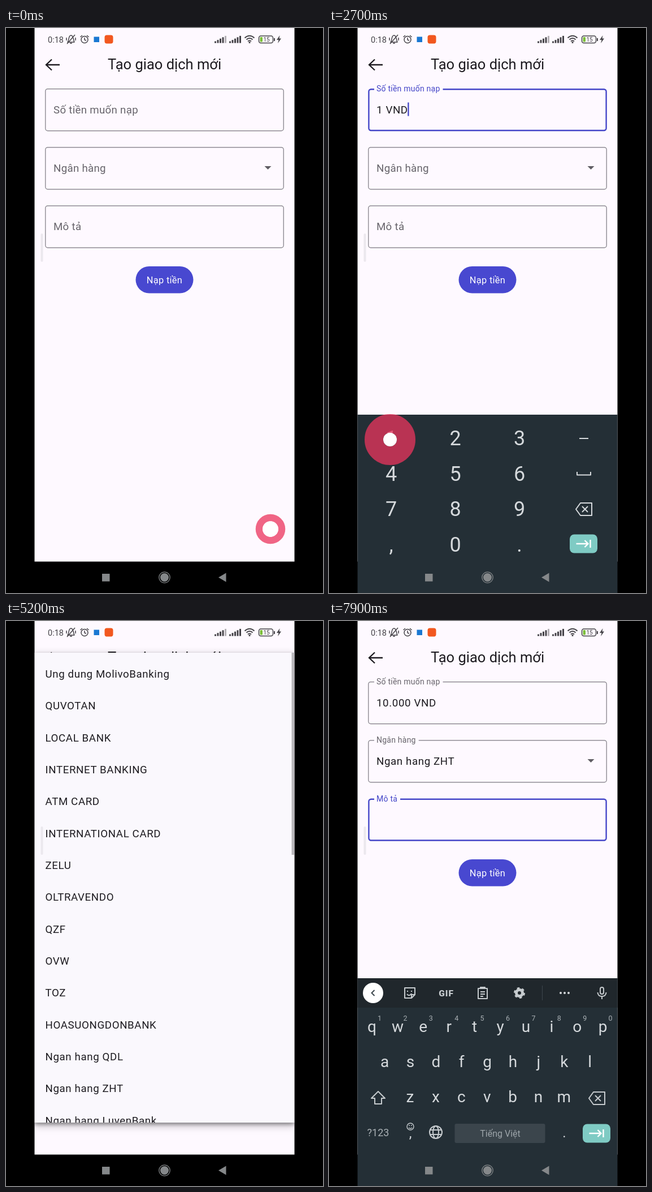
These frames come from a looping animation (561x998 px, 8000 ms). An HTML page:

```html
<!DOCTYPE html>
<html lang="vi">
<head>
<meta charset="utf-8">
<title>Tạo giao dịch mới</title>
<style>
  html, body { margin: 0; width: 100%; height: 100%; overflow: hidden; background: #000; }
  svg { display: block; }
  text { font-family: Roboto, "Open Sans", sans-serif; white-space: pre; }
  .body { font-size: 18.7px; letter-spacing: .62px; fill: #1d1b20; }
  .label { font-size: 18.7px; letter-spacing: .3px; }
  .line { fill: none; stroke: currentColor; stroke-width: 2; stroke-linejoin: round; }
  .mid { text-anchor: middle; }
  #sheet { filter: drop-shadow(0 3px 3px #0005) drop-shadow(0 4px 7px #0004); }
</style>
</head>
<body>
<svg width="561" height="998" viewBox="0 0 561 998">
  <defs>
    <clipPath id="phone"><rect x="50.500" y="0" width="460" height="998"/></clipPath>
    <clipPath id="window"><rect id="hole" x="50.500" width="460"/></clipPath>
    <g id="erase" class="line">
      <path d="M-14 0L-6-11H14V11H-6ZM-3-5L7 5M7-5L-3 5"/>
    </g>
    <g id="next">
      <rect x="-24.5" y="-16.5" width="49" height="33" rx="8" fill="#7fcbc4"/>
      <path d="M-13 0H8M2-6L8 0L2 6M12-7V7" fill="none" stroke="#fff" stroke-width="2.4"/>
    </g>
  </defs>
  <rect width="561" height="998"/>
  <g clip-path="url(#phone)">
    <rect x="50" width="461" height="942.5" fill="#fef9ff"/>

    <path d="M95 65H71M81 55.500L71 65L81 74.500" fill="none" stroke="#1d1b20" stroke-width="2.3"/>
    <text class="mid" x="280.500" y="73" font-size="25.5" fill="#1d1b20">Tạo giao dịch mới</text>
    <g id="form"></g>
    <path d="M457.500 244H469.500L463.500 250Z" fill="#605d64"/>
    <rect x="229.500" y="421" width="102" height="47.500" rx="23.750" fill="#4848d0"/>
    <text class="mid" x="280.500" y="451" font-size="16.4" letter-spacing=".3" fill="#fff">Nạp tiền</text>
    <rect id="caret" width="2.3" height="24" fill="#4446c8"/>

    <g id="menu">
      <rect id="sheet" x="50.500" width="460" fill="#faf8fd"/>
      <g clip-path="url(#window)">
        <g id="rows"></g>
        <rect id="thumb" x="505.500" width="5" height="357" fill="#b9b7bb"/>
      </g>
    </g>

    <g id="status" fill="#454348" color="#454348">
      <text x="74" y="25.500" font-size="14.5">0:18</text>
      <g class="line" style="stroke-width:1.5">
        <path d="M109 25C112 22 110 13 115 13S119 22 121 25ZM113 27H117M108 28L122 12M107 17V22M123 17V22"/>
        <circle cx="139" cy="20.500" r="6"/>
        <path d="M139 17V21L142 22M131.500 16L135 13M143 13L146.500 16"/>
        <path d="M422.500 17.500Q431 10 439.500 17.500M425.500 20.500Q431 15.500 436.500 20.500M428 23.500Q431 21 434 23.500" style="stroke-width:2"/>
        <rect x="447.500" y="14" width="25" height="12.500" rx="3.500"/>
      </g>
      <circle cx="431" cy="25.500" r="1.6"/>
      <rect x="155.500" y="15.500" width="9.500" height="9.500" fill="#1a78d2"/>
      <rect x="174.500" y="12.500" width="15" height="15" rx="4" fill="#f2581f"/>
      <rect x="449.500" y="16" width="4.500" height="8.500" rx="1" fill="#7cbf3a"/>
      <text class="mid" x="461" y="24" font-size="10">15</text>
      <path d="M474 18h2v5h-2ZM484.500 13L479 21H482.500L481 27L487 18.500H483.500Z"/>
    </g>
    <rect x="61.500" y="363" width="4" height="50" rx="2" fill="#e9e6eb" opacity=".85"/>

    <g id="digits" fill="#d5d9dc" color="#d5d9dc">
      <rect x="50" y="683" width="461" height="320" fill="#242f36"/>
      <rect id="pressed" width="114" height="63" fill="#3c464c"/>
    </g>
    <g id="letters" fill="#d5d9dc" color="#c6cbce">
      <rect x="50" y="631" width="461" height="370" fill="#242f36"/>
      <rect x="50" y="631" width="461" height="52" fill="#20272c"/>
      <circle cx="78" cy="657" r="18" fill="#fff"/>
      <path d="M80.500 652L75.500 657L80.500 662" fill="none" stroke="#3c464c" stroke-width="2"/>
      <g class="line">
        <path d="M134 648H152V660L146 666H134ZM152 660H146V666M138 659Q142 664 146 658M139 653V655M146 653V655"/>
        <path d="M264 649H280V667H264ZM268 649V647H276V649M268 655H276M268 659H276M268 663H273"/>
        <circle cx="337" cy="657" r="5.500" style="stroke-width:5"/>
        <circle cx="337" cy="657" r="8.500" style="stroke-width:3" stroke-dasharray="4.450"/>
        <rect x="480" y="647" width="6" height="12" rx="3"/>
        <path d="M475.500 656Q476 663 483 663T490.500 656M483 663V668"/>
        <path d="M87 831L99 843H93V853H81V843H75Z"/>
        <circle cx="144" cy="893" r="6" style="stroke-width:1.4"/>
        <path d="M141 895Q144 898 147 895M142 890V892M146 890V892" style="stroke-width:1.4"/>
        <circle cx="189" cy="903" r="11"/>
        <ellipse cx="189" cy="903" rx="5" ry="11"/>
        <path d="M179 899H199M179 907H199"/>
      </g>
      <path d="M377.500 644V670" stroke="#3c464c"/>
      <circle cx="410" cy="657" r="2"/><circle cx="417" cy="657" r="2"/><circle cx="424" cy="657" r="2"/>
      <rect x="222.500" y="888" width="160" height="34" rx="3" fill="#3b454c"/>
      <use href="#erase" x="474" y="843"/>
      <use href="#next" x="473.500" y="905"/>
    </g>
    <g fill="#85888a">
      <rect x="170" y="964" width="13.500" height="13.500"/>
      <circle cx="280.500" cy="970.500" r="7.500"/>
      <circle cx="280.500" cy="970.500" r="9.700" fill="none" stroke="#85888a" stroke-width="1.3"/>
      <path d="M376 970.500L389.500 962.500V978.500Z"/>
    </g>
  </g>
  <g id="touches"></g>
</svg>
<script>
const $ = id => document.getElementById(id);
const clamp = v => Math.min(1, Math.max(0, v));
const lerp = (a, b, p) => a + (b - a) * p;
const ease = (t, start, length) => {
  const p = clamp((t - start) / length);
  return p * p * (3 - 2 * p);
};

function add(parent, tag, attrs, text = '') {
  const el = document.createElementNS('http://www.w3.org/2000/svg', tag);
  set(el, attrs);
  el.textContent = text;
  return parent.appendChild(el);
}
function set(el, attrs) {
  for (const name in attrs) el.setAttribute(name, attrs[name]);
}
const key = (board, x, y, size, text, more) =>
  add(board, 'text', { class: 'mid', x, y, 'font-size': size, ...more }, text);

// Signal bars
for (const x of [369, 395])
  for (let i = 0; i < 5; i++) {
    const h = 3 + i * 2.4;
    add($('status'), 'rect', { x: x + i * 4.5, y: 26.5 - h, width: 3, height: h, opacity: x < 380 && i == 4 ? .4 : 1 });
  }

// Number pad
['123', '456', '789', ',0.'].forEach((row, r) =>
  [...row].forEach((c, i) => key($('digits'), 110 + i * 113.5, 737 + r * 62.6, 36, c)));
add($('digits'), 'path', { class: 'line', d: 'M443 725H459M439 784V789.500H463V784' });
add($('digits'), 'use', { href: '#erase', x: 451, y: 850 });
add($('digits'), 'use', { href: '#next', x: 450.5, y: 911 });

// Letter keyboard
[['qwertyuiop', 76, 726], ['asdfghjkl', 98.5, 788], ['zxcvbnm', 143.5, 850]].forEach(([row, x, y], r) =>
  [...row].forEach((c, i) => {
    key($('letters'), x + i * 45.4, y, 28, c);
    if (!r) key($('letters'), x + 13.5 + i * 45.4, 705.5, 12.5, (i + 1) % 10, { fill: '#a9b0b4' });
  }));
key($('letters'), 87, 909.5, 18, '?123', { fill: '#a9b0b4' });
key($('letters'), 144, 913, 24, ',');
key($('letters'), 416.5, 912, 24, '.');
key($('letters'), 303, 911, 16, 'Tiếng Việt', { fill: '#9ea6ab' });
key($('letters'), 207.5, 662.5, 15.5, 'GIF', { 'font-weight': 900, fill: '#c6cbce', 'letter-spacing': 1 });

// Bank list
const bank = 'Ngan hang ZHT';
const rows = ['Ung dung MolivoBanking', 'QUVOTAN', 'LOCAL BANK', 'INTERNET BANKING', 'ATM CARD',
  'INTERNATIONAL CARD', 'ZELU', 'OLTRAVENDO', 'QZF', 'OVW', 'TOZ', 'HOASUONGDONBANK', 'Ngan hang QDL',
  bank, 'Ngan hang LuvenBank', 'Ngan hang OdaxBank', 'Ngan hang ZFBANK', 'Ngan hang TuvoBank', 'Vi dien tu QoZiva'];
rows.forEach((name, i) => add($('rows'), 'text', { class: 'body', x: 69.5, y: 100 + i * 56.33 }, name));

// Form fields: float = when the label rises, focus = [from, to]
const typed = [[3700, '10.000'], [3400, '1.000'], [3000, '100'], [2900, '10'], [2700, '1']];
const amount = t => {
  const hit = typed.find(([at]) => t >= at);
  return hit ? hit[1] + ' VND' : '';
};
const fields = [
  { y: 107, label: 'Số tiền muốn nạp', float: 1725, focus: [1725, 4300], value: amount },
  { y: 210.2, label: 'Ngân hàng', float: 6500, focus: [9e3, 9e3], value: t => t >= 6500 ? bank : '' },
  { y: 313.5, label: 'Mô tả', float: 7100, focus: [7100, 9e3], value: () => '' },
];
for (const f of fields) {
  f.box = add($('form'), 'rect', { rx: 4, fill: 'none' });
  f.gap = add($('form'), 'rect', { x: 80, y: f.y - 2, height: 6, fill: '#fef9ff' });
  f.name = add($('form'), 'text', { class: 'label' }, f.label);
  f.text = add($('form'), 'text', { class: 'body', x: 84, y: f.y + 43.5 });
}

// Touches: x, y, down, up and, on the number pad, the key's column and row
const zero = [226, 916];
const touches = [
  [468, 885, -25, 0], [413.5, 157.5, 1550, 1700],
  [108, 727, 2600, 2700, 0, 0], [...zero, 2780, 2880, 1, 3], [...zero, 2920, 3020, 1, 3],
  [229, 911, 3300, 3400, 1, 3], [...zero, 3600, 3700, 1, 3],
  [400, 250, 4100, 4250], [316, 458.5, 5300, 6100], [190, 589, 6300, 6420], [337, 346, 6740, 6880],
].map(([x, y, down, up, col, row]) => {
  const g = add($('touches'), 'g', {});
  const ring = add(g, 'circle', { fill: 'none', stroke: '#eb345c', opacity: .75 });
  return { x, y, down, up, col, row, g, ring, dot: add(g, 'circle', { fill: '#fff' }) };
});

function drawForm(t) {
  let caret = null;
  for (const f of fields) {
    const p = ease(t, f.float, 150);
    const focused = t >= f.focus[0] && t < f.focus[1];
    const w = focused ? 2.4 : 1.2;
    set(f.box, {
      x: 69.2 + w / 2, y: f.y + w / 2, width: 422.6 - w, height: 75.2 - w,
      stroke: focused ? '#4446c8' : '#7b7880', 'stroke-width': w,
    });
    set(f.name, {
      transform: `translate(84 ${lerp(f.y + 43.5, f.y + 5.2, p)}) scale(${lerp(1, .75, p)})`,
      fill: focused ? '#4446c8' : '#67646b',
    });
    set(f.gap, { width: p * (f.name.getComputedTextLength() * .75 + 9) });
    f.text.textContent = f.value(t);
    if (focused) caret = f;
  }
  if (!caret) return set($('caret'), { opacity: 0 });
  const edit = caret.y < 200 && typed.find(([at]) => t >= at);
  const since = t - (edit ? edit[0] : caret.focus[0]);
  const length = caret.text.textContent ? caret.text.getComputedTextLength() : 0;
  set($('caret'), { x: 83.5 + length, y: caret.y + 24.5, opacity: since % 1000 < 500 ? 1 : 0 });
}

function drawMenu(t, scroll) {
  const open = ease(t, 4700, 200);
  const top = lerp(219, 56, open), height = lerp(275, 886, open) - top;
  set($('menu'), { opacity: clamp((t - 4650) / 100) * (1 - clamp((t - 6480) / 200)) });
  for (const id of ['sheet', 'hole']) set($(id), { y: top, height });
  set($('rows'), { transform: `translate(0 ${-scroll})`, opacity: clamp((t - 4800) / 150) });
  set($('thumb'), { y: 56 + scroll * .43, opacity: clamp((t - 4900) / 150) });
}

function drawTouches(t, scroll) {
  let held = null;
  for (const o of touches) {
    const grow = clamp((Math.min(t, o.up) - o.down) / 100);
    const fade = clamp((t - o.up) / 350);
    const y = o.down == 5300 ? o.y + 237 - scroll : o.y;
    const outer = 20 + 25 * grow - 3 * fade, inner = 14.5 - 2.5 * grow;
    set(o.g, { opacity: t < o.down ? 0 : 1 - fade, transform: `translate(${o.x} ${y})` });
    set(o.ring, { r: (outer + inner) / 2, 'stroke-width': outer - inner });
    set(o.dot, { r: inner, opacity: .3 + .7 * clamp(grow * 4) });
    if (o.row != null && t >= o.down && t < o.up) held = o;
  }
  set($('pressed'), held
    ? { x: 53 + held.col * 113.5, y: 692 + held.row * 62.6, opacity: 1 }
    : { opacity: 0 });
}

function draw(t) {
  const scroll = 237 * ease(t, 5400, 550);
  drawForm(t);
  drawMenu(t, scroll);
  drawTouches(t, scroll);
  const pad = ease(t, 1800, 245) - ease(t, 4350, 250);
  set($('digits'), { transform: `translate(0 ${315 * (1 - pad)})` });
  set($('letters'), { transform: `translate(0 ${367 * (1 - ease(t, 7170, 245))})` });
}

const start = performance.now();
function tick() {
  draw(Math.floor((performance.now() - start) % 8000 / 100) * 100);
  requestAnimationFrame(tick);
}
tick();
</script>
</body>
</html>
```
